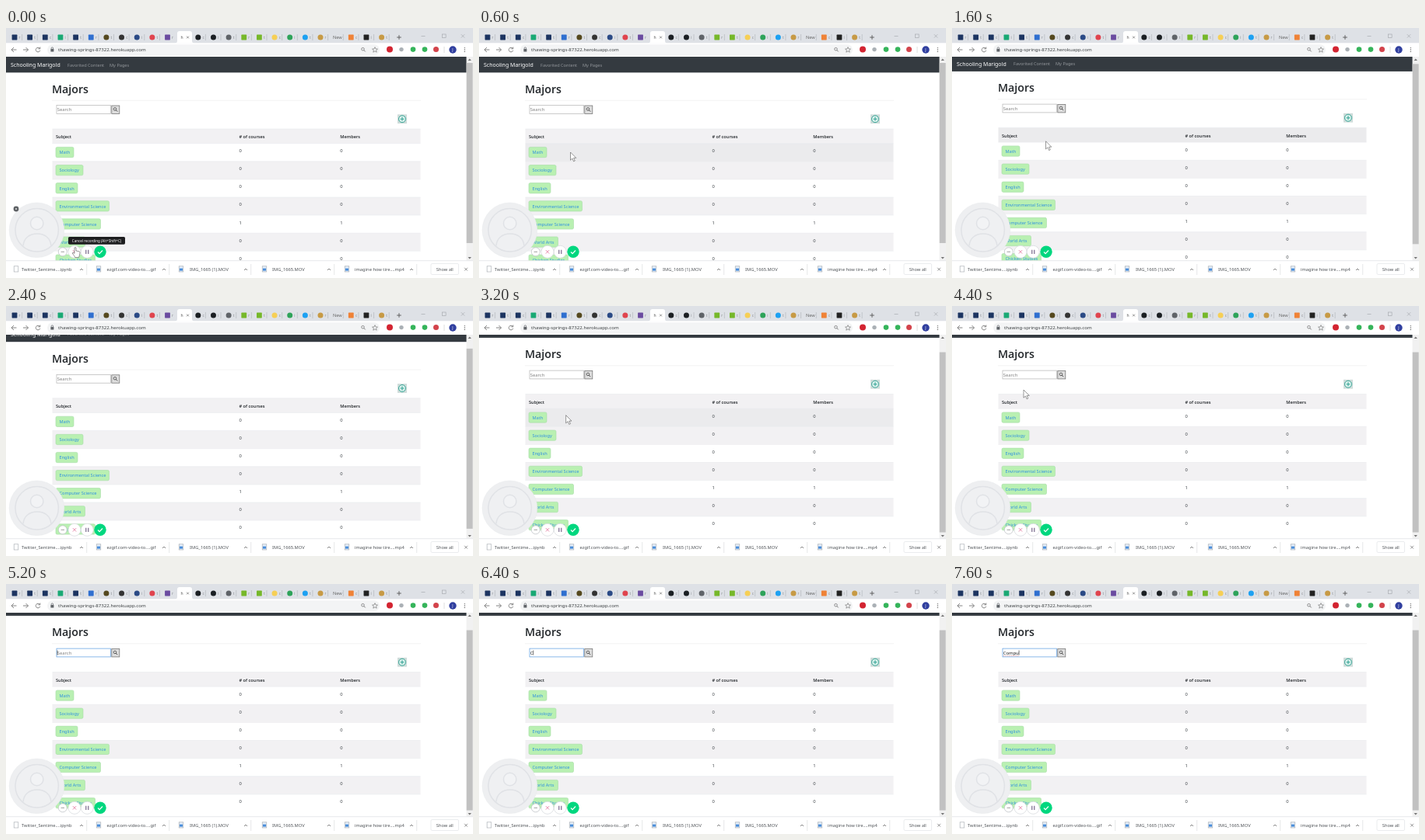
Animation, 600 px wide and 322 px high, one loop 8000 ms. Source, as an HTML page:

```html
<!DOCTYPE html>
<html lang="en">
<head>
<meta charset="utf-8">
<title>Majors</title>
<style>
html, body { margin: 0; width: 100%; height: 100%; overflow: hidden; background: #fff; }
svg { display: block; width: 100%; height: 100%; }
text { font-family: "Noto Sans", "Open Sans", sans-serif; white-space: pre; }
.strong { font-family: "Open Sans", "Noto Sans", sans-serif; font-weight: 600; }
</style>
</head>
<body>
<svg id="stage" viewBox="0 0 600 322"></svg>
<script>
const LOOP = 8000, STEP = 200;
const TABLE_TOP = 130, ROW_TOP = 148.7, ROW_H = 23.1;

const rect = (x, y, w, h, fill, more = '') =>
  `<rect x="${x}" y="${y}" width="${w}" height="${h}" fill="${fill}" ${more}/>`;
const disc = (x, y, r, fill, more = '') =>
  `<circle cx="${x}" cy="${y}" r="${r}" fill="${fill}" ${more}/>`;
const line = (d, stroke, width = 0.8, more = '') =>
  `<path d="${d}" fill="none" stroke="${stroke}" stroke-width="${width}" ${more}/>`;
const text = (x, y, str, size, fill, more = '') =>
  `<text x="${x}" y="${y}" font-size="${size}" fill="${fill}" ${more}>${str}</text>`;
const group = (id, body, more = '') => `<g id="${id}" ${more}>${body}</g>`;
const cross = (x, y, r, color, width) =>
  line(`M${x - r} ${y - r}l${2 * r} ${2 * r}m0 ${-2 * r}l${-2 * r} ${2 * r}`, color, width);
const lens = (x, y, color) =>
  line(`M${x + 1.2} ${y + 1.2}l2 2`, color, 0.9) +
  disc(x, y, 1.8, 'none', `stroke="${color}" stroke-width=".7"`);

const subjects = [
  ['Math', 23], ['Sociology', 35], ['English', 28], ['Environmental Science', 68.5],
  ['Computer Science', 57.5], ['World Arts', 37.5], ['Chicken Studies', 50.5]
];

function subjectRow([name, width], i) {
  const y = ROW_TOP + i * ROW_H;
  const count = name === 'Computer Science' ? 1 : 0;
  return rect(59.5, y, 473, ROW_H, '#fff', 'class="row"') +
    line(`M59.5 ${y}h473`, '#e3e5e8', 0.5) +
    rect(64, y + 4.7, width, 13.3, '#b9f0b2', 'rx="1.8" stroke="#a6dca6" stroke-width=".6"') +
    text(68.5, y + 13.6, name, 5.65, '#2f8fe0') +
    text(299.5, y + 11.4, count, 5.8, '#3d4247') +
    text(429.3, y + 11.4, count, 5.8, '#3d4247');
}

function page() {
  const strong = 'class="strong"';
  return rect(0, 37, 600, 20.4, '#343a40') +
    text(6, 50, 'Schooling Marigold', 7, '#fff') +
    text(79, 49.6, 'Favorited Content', 5.6, '#92969a') +
    text(133, 49.6, 'My Pages', 5.6, '#92969a') +
    text(59, 83.8, 'Majors', 14.2, '#212529', strong) +
    line('M59 93.3h474', '#e9e9ea', 0.6) +
    rect(65, 99.6, 69.5, 10.8, '#fff', 'id="field" stroke-width=".7"') +
    text(65.7, 107.2, '', 5.9, '#757575', 'id="query"') +
    line('M66 109h20', '#e26a6a', 0.6, 'id="squiggle" stroke-dasharray="1 .7"') +
    line('M0 102v6', '#111', 0.6, 'id="caret"') +
    rect(135.8, 100, 10, 10.4, '#dedede', 'stroke="#777" stroke-width=".8"') +
    lens(140, 104.4, '#333') +
    rect(503, 111.3, 12, 11.8, '#cfdcda') +
    disc(509, 117.2, 4.5, '#d9f1ec', 'stroke="#3aa597" stroke-width="1"') +
    line('M506.6 117.2h4.8M509 114.8v4.8', '#3aa597', 1.1) +
    rect(59.5, TABLE_TOP, 473, ROW_TOP - TABLE_TOP, '#f2f1f3', 'class="row"') +
    line(`M59.5 ${TABLE_TOP}h473`, '#e3e5e8', 0.5) +
    text(64, 142.1, 'Subject', 5.65, '#212529', strong) +
    text(299.5, 142.1, '# of courses', 5.65, '#212529', strong) +
    text(429.3, 142.1, 'Members', 5.65, '#212529', strong) +
    subjects.map(subjectRow).join('');
}

function scrollbar() {
  return rect(591.5, 37, 8.5, 263, '#f1f1f1') +
    '<path d="M593.5 42l2.2-2.4 2.2 2.4zM593.5 295l2.2 2.4 2.2-2.4z" fill="#777"/>' +
    rect(591.7, 45, 7.9, 232, '#c1c1c1', 'id="thumb"');
}

// Leading "o" marks a round icon; "-" has no icon.
const icons = ('#1c3461 #1c3461 #1c3461 #19a974 #1c3461 #2f6fd0 o#55491f o#333 o#2b4a86 o#e0444e ' +
  '#6a4ba0 - o#1b1f23 o#1b1f23 o#5f6368 #76b82a #76b82a o#f6cf55 o#2ea35a o#1da1f2 o#c79a45 ' +
  '- #ef8236 #222 o#c79a45').split(' ');

function tabs() {
  let out = rect(0, 0, 600, 19.5, '#dee1e6') +
    '<path d="M217 19.5q3 0 3-3V7q0-3 3-3h13q3 0 3 3v9.5q0 3 3 3z" fill="#fff"/>';
  icons.forEach((icon, i) => {
    const x = 11 + i * 19.65, color = icon.replace('o', '');
    if (icon[0] === 'o') out += disc(x, 12, 3.5, color);
    else if (icon !== '-') out += rect(x - 3.4, 8.6, 6.8, 6.8, color, 'rx=".6"');
    if (icon !== '-') out += text(x + 5.6, 13.6, 'rtcit'[i % 5], 4.6, '#85898e');
    if (i < 10 || i > 11) out += line(`M${x + 9.6} 8v8`, '#a5a9ae', 0.5);
  });
  return out + text(224.5, 14, 'h', 5, '#555') + cross(233.5, 12, 1.4, '#666', 0.7) +
    text(420, 14, 'New', 5.6, '#666') +
    line('M502.2 12h5.6M505 9.2v5.6', '#555', 0.9) +
    line('M533.5 10.5h5', '#a0a3a8', 0.6) +
    rect(560.5, 8, 4.6, 4.6, 'none', 'stroke="#a0a3a8" stroke-width=".6"') +
    cross(587, 10.4, 2.2, '#a0a3a8', 0.6);
}

function toolbar() {
  return rect(0, 19.5, 600, 17.5, '#fff') +
    line('M13.5 28h-6.5m3-3l-3 3 3 3', '#666', 0.8) +
    line('M22 28h6.5m-3-3l3 3-3 3', '#666', 0.8) +
    line('M43.2 26.2a2.8 2.8 0 1 0 .6 2.6M43.8 24.5v2.3h-2.3', '#666', 0.8) +
    rect(53, 21.3, 427, 13.6, '#f3f4f5', 'rx="6.8"') +
    rect(57.4, 27, 4, 3.6, '#5f6368', 'rx=".4"') +
    line('M58.2 27v-1a1.2 1.2 0 0 1 2.4 0v1', '#5f6368', 0.7) +
    text(67, 30.2, 'thawing-springs-87322.herokuapp.com', 6.1, '#3c4043') +
    lens(458.5, 27.2, '#666') +
    line('M474 24.6l1 2.3 2.5.2-1.9 1.6.6 2.5-2.2-1.4-2.2 1.4.6-2.5-1.9-1.6 2.5-.2z', '#666', 0.6) +
    disc(493, 27.6, 4, '#d32431') +
    disc(508, 27.6, 2.7, '#aab0b5') +
    disc(523, 27.6, 3.3, '#35b45a') +
    disc(538, 27.6, 3.3, '#35b45a') +
    disc(552.5, 27.6, 3.5, '#d3434b') +
    line('M563 24v8', '#ccc', 0.6) +
    disc(574, 28, 4.7, '#303f9f') +
    text(574, 29.8, 'J', 5, '#fff', 'text-anchor="middle"') +
    [25.6, 28, 30.4].map(y => disc(589.3, y, 0.7, '#666')).join('');
}

const downloads = [
  [13, 20, 97, 'Twitter_Sentime....ipynb'], [119, 129.5, 203, 'ezgif.com-video-to....gif'],
  [225, 236, 308, 'IMG_1665 (1).MOV'], [332, 342, 415, 'IMG_1665.MOV'],
  [438, 448, 521, 'imagine how tire....mp4']
];

function downloadBar() {
  const item = ([icon, label, chevron, name], i) =>
    rect(icon - 2.8, 306.8, 5.6, 7.2, i ? '#e3edf8' : '#fff', 'stroke="#a0a6ac" stroke-width=".6"') +
    (i ? rect(icon - 2, 309.6, 4, 3, '#4a8edb') : '') +
    text(label, 313.2, name, 5.75, '#505458') +
    line(`M${chevron - 2} 312l2-2 2 2`, '#666', 0.8) +
    line(`M${chevron + 6.7} 304v14`, '#d5d7da', 0.6);
  return rect(0, 299.5, 600, 22.5, '#fff') + line('M0 299.7h600', '#d8dadd', 0.6) +
    downloads.map(item).join('') +
    rect(546, 303.5, 35.5, 14, '#fff', 'rx="1.5" stroke="#dcdfe2" stroke-width=".6"') +
    text(563.8, 312.7, 'Show all', 5.7, '#505458', 'text-anchor="middle"') +
    cross(591, 310.7, 1.9, '#666', 0.7);
}

function recorder() {
  const ring = 'stroke="#d4d7db" stroke-width=".7"';
  return disc(39.5, 260.3, 35.3, '#eeeff1', 'stroke="#e6e8ea" stroke-width=".5"') +
    disc(39.7, 260.3, 27.7, '#eff0f2', 'stroke="#e0e2e6" stroke-width="1.5"') +
    disc(39.7, 251.5, 8.2, '#f2f3f5', 'stroke="#e0e2e6" stroke-width="1.5"') +
    line('M22 280.5c1-10 8-15.5 18-15.5s17 5.5 18 15.5', '#e0e2e6', 1.5) +
    disc(72.8, 288.3, 5.5, '#fff', 'stroke="#b9bdc2" stroke-width=".7"') +
    line('M70.6 288.3h4.4', '#888', 0.8) +
    disc(88, 288.3, 8, '#fff', ring) + cross(88, 288.3, 2.2, '#e0729a', 0.8) +
    disc(104.3, 288.3, 8, '#fff', ring) + line('M102.8 285.7v5.2m3 0v-5.2', '#6c5a80', 1.1) +
    disc(121, 288.3, 7.7, '#00d77f') + line('M118 288.5l2.1 2.1 3.9-4.1', '#fff', 1.1) +
    group('hint',
      disc(13, 233, 3.4, '#5d6064') + cross(13, 233, 1.1, '#fff', 0.6) +
      rect(80, 269, 73, 9.7, '#1d1d1f', 'rx="1.6"') +
      text(116.5, 275.7, 'Cancel recording (Alt+Shift+C)', 4.55, '#fff', 'text-anchor="middle"'));
}

const outline = 'fill="#fff" stroke="#555" stroke-width=".6" stroke-linejoin="round"';
const pointers =
  `<path id="arrow" d="M0 0v10.2l2.4-2.2 1.7 3.8 1.7-.8-1.7-3.6h3.2z" ${outline}/>` +
  `<path id="hand" d="M-1 0q1-1 2 0v4l4 .8q1 .3 1 1.5l-.8 4.2-.7 2h-4.8l-1-2-2.6-3.6q.7-1.3 2.9.4z" ${outline}/>` +
  line('M-1.5 -4.5h3M0 -4.5v9M-1.5 4.5h3', '#222', 0.7, 'id="beam"');

document.getElementById('stage').innerHTML =
  rect(0, 0, 600, 322, '#fff') + group('page', page()) + scrollbar() +
  tabs() + toolbar() + downloadBar() + recorder() + pointers;

const $ = id => document.getElementById(id);
const show = (id, on) => $(id).setAttribute('visibility', on ? 'visible' : 'hidden');
const move = (id, x, y) => $(id).setAttribute('transform', `translate(${x} ${y})`);
const rows = [...document.querySelectorAll('.row')];

// Linear interpolation through [time, value...] keys.
function at(keys, t) {
  const i = keys.findIndex(k => k[0] > t);
  if (i < 0) return keys[keys.length - 1].slice(1);
  if (i === 0) return keys[0].slice(1);
  const a = keys[i - 1], b = keys[i], u = (t - a[0]) / (b[0] - a[0]);
  return a.slice(1).map((v, n) => v + (b[n + 1] - v) * u);
}

const scrollKeys = [[1400, 0], [1600, 1.5], [2000, 6.5], [2400, 11.2], [2800, 16.5]];
const pointerKeys = [
  [0, 89, 283], [200, 94, 262], [400, 109, 200], [600, 117.5, 160], [1200, 119, 156],
  [1600, 120.5, 145.8], [2200, 120, 144], [2800, 113, 142], [3400, 111, 140],
  [3800, 111, 140], [4400, 92, 108], [4800, 76, 89]
];
const typed = [6400, 6800, 7000, 7400, 7600];

function draw(time) {
  const t = Math.floor(time / STEP) * STEP;
  const [scroll] = at(scrollKeys, t);
  const [x, y] = at(pointerKeys, t);
  const visible = t < 2200 || (t >= 2800 && t < 5000);
  const hand = t < 200, focus = t >= 5000;
  const docY = y + scroll;
  const beam = docY > 99 && docY < 111;

  move('page', 0, -scroll);
  move('thumb', 0, scroll * 0.88);
  show('hint', hand);
  for (const id of ['arrow', 'hand', 'beam']) move(id, x, y);
  show('hand', hand);
  show('beam', visible && beam);
  show('arrow', visible && !hand && !beam);

  rows.forEach((row, i) => {
    const top = +row.getAttribute('y'), bottom = top + +row.getAttribute('height');
    const hover = visible && !hand && docY >= top && docY < bottom;
    row.setAttribute('fill', hover ? '#ebebed' : i % 2 ? '#fff' : '#f2f1f3');
  });

  const word = 'Compu'.slice(0, typed.filter(k => t >= k).length);
  $('query').textContent = word || 'Search';
  $('query').setAttribute('fill', word ? '#222' : '#808080');
  $('field').setAttribute('stroke', focus ? '#5a9be0' : '#b4b4b4');
  const end = word ? $('query').getComputedTextLength() : 0;
  move('caret', 66 + end, 0);
  show('caret', focus);
  $('squiggle').setAttribute('d', `M66 109h${end}`);
  show('squiggle', word.length > 1);
}

function tick() {
  draw(performance.now() % LOOP);
  requestAnimationFrame(tick);
}
tick();
</script>
</body>
</html>
```
